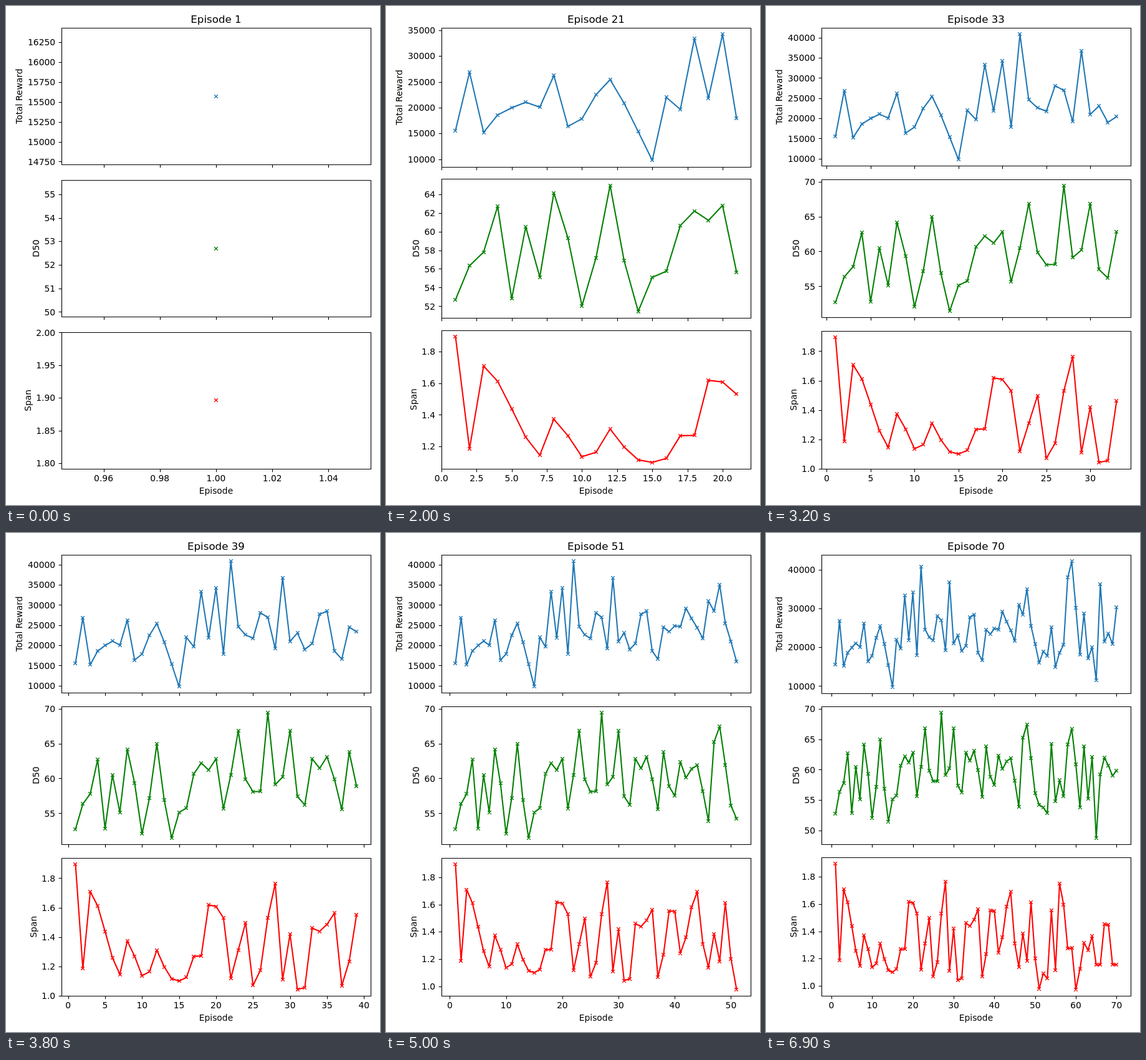
An HTML page with a canvas that plays this animation: 600x800 px, repeating every 7 s.

```html
<!DOCTYPE html>
<html>
<head>
<meta charset="utf-8">
<style>
  html, body { margin: 0; width: 100%; height: 100%; overflow: hidden; background: #fff; }
  canvas { display: block; }
</style>
</head>
<body>
<canvas id="chart" width="600" height="800"></canvas>
<script>
const reward = [
  15570, 26860, 15200, 18575, 19950, 21050, 20070, 26230, 16350, 17850,
  22500, 25430, 20830, 15340, 9770, 21980, 19660, 33350, 21830, 34200,
  17880, 40850, 24600, 22600, 21750, 28090, 26930, 19200, 36750, 20980,
  23060, 19000, 20430, 27700, 28480, 18580, 16600, 24530, 23370, 24840,
  24610, 29200, 26620, 24380, 21670, 30950, 28480, 35050, 25460, 20900,
  15950, 18950, 17820, 25160, 14920, 18630, 20650, 37980, 42180, 30160,
  18070, 28790, 17080, 19980, 11450, 36300, 21420, 23520, 20860, 30270];
const d50 = [
  52.7, 56.34, 57.8, 62.7, 52.8, 60.5, 55.13, 64.15, 59.3, 52.05,
  57.2, 64.95, 56.87, 51.45, 55.1, 55.75, 60.65, 62.2, 61.2, 62.8,
  55.65, 60.5, 66.85, 59.85, 58.1, 58.13, 69.42, 59.1, 60.2, 66.85,
  57.4, 56.2, 62.8, 61.45, 63.1, 59.9, 55.55, 63.8, 58.85, 57.5,
  62.35, 60.1, 61.35, 61.9, 58.15, 53.85, 65.25, 67.45, 61.9, 56.1,
  54.2, 53.75, 52.8, 64.25, 54.75, 58.25, 55.65, 64.15, 66.75, 60.85,
  53.75, 63.9, 55.2, 62.1, 48.7, 59.2, 62, 60.65, 59, 59.85];
const span = [
  1.896, 1.185, 1.708, 1.612, 1.438, 1.258, 1.145, 1.372, 1.268, 1.135,
  1.163, 1.31, 1.196, 1.115, 1.099, 1.124, 1.268, 1.27, 1.618, 1.608,
  1.53, 1.118, 1.309, 1.498, 1.07, 1.173, 1.53, 1.764, 1.11, 1.419,
  1.042, 1.055, 1.46, 1.438, 1.485, 1.562, 1.068, 1.234, 1.552, 1.55,
  1.243, 1.358, 1.582, 1.692, 1.312, 1.138, 1.385, 1.184, 1.612, 1.202,
  0.977, 1.09, 1.053, 1.554, 1.113, 1.75, 1.596, 1.273, 1.278, 0.973,
  1.122, 1.315, 1.262, 1.365, 1.153, 1.154, 1.452, 1.447, 1.157, 1.153];

const panels = [
  { label: 'Total Reward', data: reward, color: '#1f77b4' },
  { label: 'D50', data: d50, color: '#008000' },
  { label: 'Span', data: span, color: '#ff0000' }
];
const EPISODES = reward.length, STEP_MS = 100;
const LEFT = 88.9, RIGHT = 585, TOP = 35.33, BOTTOM = 741.8;
const TICK = 4.86, PAD = 15, MARK = 2.78;
const ctx = document.getElementById('chart').getContext('2d');
const snap = v => Math.floor(v + 0.5) + 0.5;

// Data range plus a 5% margin; a single value is widened first.
function limits(values) {
  let lo = Math.min(...values), hi = Math.max(...values);
  if (lo === hi) { lo *= 0.95; hi *= 1.05; }
  const margin = (hi - lo) * 0.05;
  return [lo - margin, hi + margin];
}

// Round tick values giving at most maxBins intervals.
function makeTicks([lo, hi], maxBins) {
  const raw = (hi - lo) / maxBins;
  const scale = 10 ** Math.floor(Math.log10(raw));
  const step = scale * [1, 2, 2.5, 5, 10].find(s => s * scale >= raw * (1 - 1e-9));
  let digits = 0;
  while (Math.abs(step * 10 ** digits - Math.round(step * 10 ** digits)) > 1e-6) digits++;
  const slack = (hi - lo) * 0.001, ticks = [];
  for (let i = Math.ceil((lo - slack) / step); i * step <= hi + slack; i++) {
    ticks.push({ value: i * step, text: (i * step).toFixed(digits) });
  }
  return ticks;
}

function layout(episode, gap) {
  const height = (BOTTOM - TOP - 2 * gap) / 3;
  const bins = Math.min(9, Math.floor(height * 0.72 / 20));
  return panels.map(({ label, data, color }, i) => {
    const values = data.slice(0, episode), range = limits(values);
    const top = TOP + i * (height + gap), bottom = top + height;
    const y = v => bottom - (v - range[0]) / (range[1] - range[0]) * height;
    return { label, color, values, top, bottom, y, ticks: makeTicks(range, bins) };
  });
}

// The gap grows when tick labels stick out of a panel.
function fitGap(episode, gap) {
  const axes = layout(episode, gap);
  const below = a => Math.max(TICK, ...a.ticks.map(t => a.y(t.value) + 8.5 - a.bottom));
  const above = a => Math.max(0, ...a.ticks.map(t => a.top - a.y(t.value) + 5.5));
  return PAD + Math.max(below(axes[0]) + above(axes[1]), below(axes[1]) + above(axes[2]));
}

const gaps = [PAD + TICK];
for (let e = 1; e <= EPISODES; e++) gaps[e] = fitGap(e, gaps[e - 1]);

function text(str, x, y, align, size = 13.89) {
  ctx.font = `${size}px "DejaVu Sans", sans-serif`;
  ctx.textAlign = align;
  ctx.fillText(str, x, y);
}

function stroke(color, width, cap, trace) {
  ctx.strokeStyle = color;
  ctx.lineWidth = width;
  ctx.lineCap = cap;
  ctx.beginPath();
  trace();
  ctx.stroke();
}

function segment(x1, y1, x2, y2) {
  ctx.moveTo(x1, y1);
  ctx.lineTo(x2, y2);
}

function drawPanel(axis, xTicks, x) {
  const points = axis.values.map((v, i) => [x(i + 1), axis.y(v)]);
  const left = snap(LEFT), right = snap(RIGHT), top = snap(axis.top), bottom = snap(axis.bottom);

  ctx.lineJoin = 'round';
  if (points.length > 1) {
    stroke(axis.color, 2.08, 'square', () => points.forEach(p => ctx.lineTo(...p)));
  }
  stroke(axis.color, 1.39, 'butt', () => points.forEach(p => {
    const [px, py] = p.map(Math.round);
    segment(px - MARK, py - MARK, px + MARK, py + MARK);
    segment(px - MARK, py + MARK, px + MARK, py - MARK);
  }));

  ctx.lineJoin = 'miter';
  stroke('#000', 1.11, 'butt', () => {
    ctx.rect(left, top, right - left, bottom - top);
    for (const t of xTicks) segment(snap(x(t.value)), bottom, snap(x(t.value)), bottom + TICK);
    for (const t of axis.ticks) segment(left, snap(axis.y(t.value)), left - TICK, snap(axis.y(t.value)));
  });

  let labelWidth = 0;
  for (const t of axis.ticks) {
    text(t.text, LEFT - 2 * TICK, Math.round(axis.y(t.value) + 5.2), 'right');
    labelWidth = Math.max(labelWidth, ctx.measureText(t.text).width);
  }
  ctx.save();
  ctx.translate(Math.round(LEFT - 2 * TICK - labelWidth - 8.56), (axis.top + axis.bottom) / 2);
  ctx.rotate(-Math.PI / 2);
  text(axis.label, 0, 0, 'center');
  ctx.restore();
}

function draw(episode) {
  const [lo, hi] = limits(episode > 1 ? [1, episode] : [1]);
  const x = v => LEFT + (v - lo) / (hi - lo) * (RIGHT - LEFT);
  const xTicks = makeTicks([lo, hi], 9), middle = (LEFT + RIGHT) / 2;

  ctx.fillStyle = '#fff';
  ctx.fillRect(0, 0, 600, 800);
  ctx.fillStyle = '#000';
  for (const axis of layout(episode, gaps[episode])) drawPanel(axis, xTicks, x);
  for (const t of xTicks) text(t.text, x(t.value), 762, 'center');
  text('Episode', middle, 782, 'center');
  text('Episode ' + episode, middle, 27, 'center', 16.67);
}

function tick() {
  draw(Math.floor(performance.now() / STEP_MS) % EPISODES + 1);
  requestAnimationFrame(tick);
}
tick();
</script>
</body>
</html>
```
